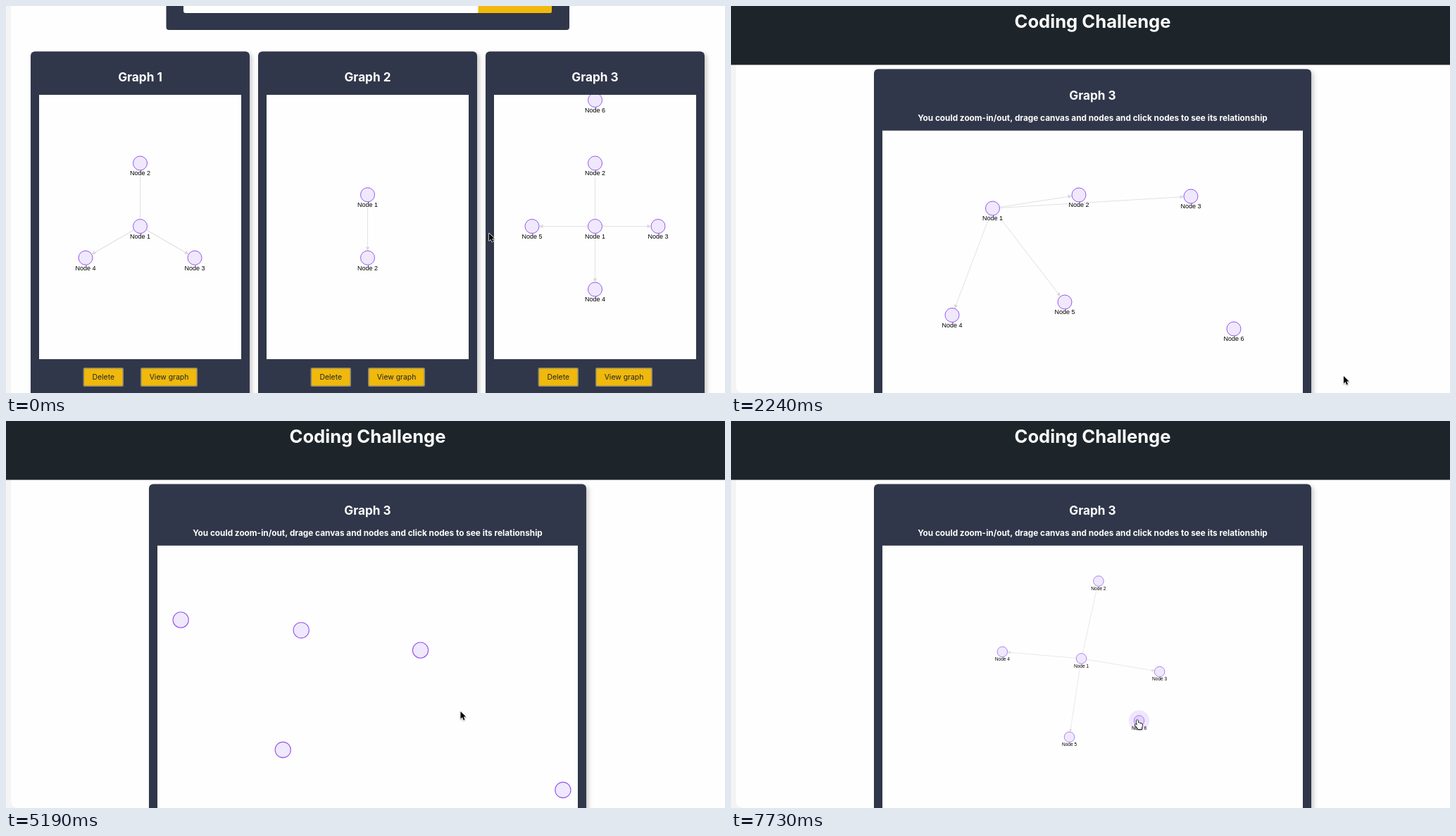
Recreate the animation shown at these times as an HTML page with a canvas. Size 1021x549 px, loop 8000 ms.

```html
<!DOCTYPE html>
<html lang="en">
<head>
<meta charset="utf-8">
<title>Graph viewer</title>
<style>
  html, body { margin: 0; width: 100%; height: 100%; overflow: hidden; background: #fefefe; }
  canvas { display: block; }
</style>
</head>
<body>
<canvas id="stage" width="1021" height="549"></canvas>
<script>
const W = 1021, H = 549, LOOP = 8000;
const STEP = 148.6;  // ms between screen updates; all times below count these steps
const ctx = document.getElementById('stage').getContext('2d');

const PAGE = '#fefefe', PANEL = '#31374a', HEADER = '#1d252a', YELLOW = '#f0b90b';
const UI = 'Inter, sans-serif', LABEL = '9px "Liberation Sans", Arial, sans-serif';
const R = 10;

const mix = (a, b, u) => a + (b - a) * u;
const mixPt = (a, b, u) => [mix(a[0], b[0], u), mix(a[1], b[1], u)];
const progress = (s, from, to) => Math.min(1, Math.max(0, (s - from) / (to - from)));
const smooth = u => u * u * (3 - 2 * u);
const easeOut = (u, p) => 1 - Math.pow(1 - u, p);
const bend = (a, c, b, u) => mixPt(mixPt(a, c, u), mixPt(c, b, u), u);

function rect(x, y, w, h, color, r = 0) {
  ctx.fillStyle = color;
  ctx.beginPath();
  ctx.roundRect(x, y, w, h, r);
  ctx.fill();
}

function text(str, x, y, font, color = PAGE) {
  ctx.font = font;
  ctx.fillStyle = color;
  ctx.textAlign = 'center';
  ctx.fillText(str, x, y);
}

function heading(str, x, y, size) {
  text(str, x, y, `bold ${size}px ${UI}`);
}

function card(x, y, w) {
  ctx.save();
  ctx.shadowColor = 'rgba(0,0,0,.22)';
  ctx.shadowBlur = 6;
  ctx.shadowOffsetX = ctx.shadowOffsetY = 3;
  rect(x, y, w, H, PANEL, 6);
  ctx.restore();
}

function clipped(x, y, w, h, paint) {
  ctx.save();
  rect(x, y, w, h, PAGE);
  ctx.beginPath();
  ctx.rect(x, y, w, h);
  ctx.clip();
  paint();
  ctx.restore();
}

function disc(x, y, r, fill, stroke) {
  ctx.beginPath();
  ctx.arc(x, y, r, 0, 2 * Math.PI);
  ctx.fillStyle = fill;
  ctx.fill();
  if (stroke) {
    ctx.strokeStyle = stroke;
    ctx.lineWidth = 1;
    ctx.stroke();
  }
}

function edge(a, b) {
  const dx = b[0] - a[0], dy = b[1] - a[1];
  const tip = Math.hypot(dx, dy) - R;
  ctx.save();
  ctx.translate(...a);
  ctx.rotate(Math.atan2(dy, dx));
  ctx.strokeStyle = '#dfdfdf';
  ctx.lineWidth = 0.9;
  ctx.beginPath();
  ctx.moveTo(R, 0);
  ctx.lineTo(tip - 4, 0);
  ctx.stroke();
  ctx.fillStyle = '#d9d9d9';
  ctx.beginPath();
  ctx.moveTo(tip, 0);
  ctx.lineTo(tip - 5.5, -2.8);
  ctx.lineTo(tip - 5.5, 2.8);
  ctx.fill();
  ctx.restore();
}

function node([x, y], name, halo) {
  if (halo) disc(x, y, R + halo * 10.3, '#f0e7fd');
  if (name) {
    ctx.font = LABEL;
    ctx.textAlign = 'center';
    ctx.lineJoin = 'round';
    ctx.lineWidth = 3;
    ctx.strokeStyle = PAGE;
    if (!halo) ctx.strokeText(name, x, y + 17.3);
    text(name, x, y + 17.3, LABEL, '#000');
  }
  disc(x, y, R, halo ? '#e3d4fb' : '#f0e8fd', '#9658f0');
}

// Node 1 is the hub of nodes 2 to `linked`; only the last loose node gets a halo.
function graph(pts, linked, detail = true, halo = 0) {
  if (detail) pts.slice(1, linked).forEach(p => edge(pts[0], p));
  pts.forEach((p, i) => node(p, detail && 'Node ' + (i + 1), i < linked ? 0 : halo));
}

// A hub followed by its spokes at the given angles.
function star(hub, len, degrees) {
  const spokes = degrees.map(d => d * Math.PI / 180)
    .map(a => [hub[0] + len * Math.cos(a), hub[1] + len * Math.sin(a)]);
  return [hub, ...spokes];
}

function button(x, w, label, hover) {
  rect(x, 513, w, 27, '#8b8672', 2);
  rect(x + 1.6, 514.6, w - 3.2, 23.8, hover ? '#c89c23' : YELLOW, 1);
  text(label, x + w / 2, 530.4, '10.4px ' + UI, '#20242e');
}

function listGraph(n, cx) {
  const len = 89.5, mid = 312.5;
  if (n === 1) graph(star([cx, mid], len, [-90, 30, 150]), 4);
  if (n === 2) graph(star([cx, mid - len / 2], len, [90]), 2);
  if (n === 3) graph([...star([cx, mid], len, [-90, 0, 90, 180]), [cx, mid - 2 * len]], 5);
}

function listPage(hover) {
  rect(227.5, -40, 572.5, 74, PANEL, 4);
  rect(252, -20, 420, 30, PAGE, 3);
  rect(670.5, -20, 104.5, 30, YELLOW, [0, 0, 2, 0]);
  for (let n = 1; n <= 3; n++) {
    const x = 323 * n - 288, cx = x + 155.5;
    card(x, 64.5, 311);
    heading('Graph ' + n, cx, 107.2, 17.2);
    clipped(x + 12, 126, 287, 375, () => listGraph(n, cx));
    button(x + 74.5, 57.5, 'Delete');
    button(x + 156, 81, 'View graph', hover && n === 3);
  }
}

// A scattered opening pose falls into a star, which then settles.
const OPEN = [[371.5, 287], [494, 268], [653, 270], [314, 438.5], [474, 420], [714, 458]];
const FALLEN = [...star([440, 291], 154, [-71, 22.4, 168.6, 97.7]), [753.5, 492.5]];
const SETTLED = [...star([442, 308.5], 154.5, [-77.5, 9.5, 184.9, 98.7]), [776.5, 512.5]];

function layout(s) {
  const fall = easeOut(progress(s, 15, 19), 1.6), settle = easeOut(progress(s, 19, 27), 2.3);
  return OPEN.map((p, i) => mixPt(mixPt(p, FALLEN[i], fall), SETTLED[i], settle));
}

// Each wheel notch scales by 0.9 around the focus: waves in and out, drifting outwards.
const FOCUS = [647, 413.7], ZOOM_FROM = 30, ZOOM_TO = 43.5;
const zooming = s => s > ZOOM_FROM && s < ZOOM_TO;
function zoom(s) {
  const n = ZOOM_TO * progress(s, 0, ZOOM_TO) - ZOOM_FROM;
  if (n <= 0) return 1;
  return 0.9 ** Math.round(n / 4.5 - 5 * Math.abs(Math.sin(Math.PI * n / 4.5)));
}

const END_ZOOM = zoom(ZOOM_TO);
const GRAB = mixPt(FOCUS, SETTLED[5], END_ZOOM), DROP = [579.5, 425];
const dragged = s => mixPt(GRAB, DROP, smooth(progress(s, 48, 52)));

function detailPage(s) {
  rect(0, 0, W, 83.5, HEADER);
  heading('Coding Challenge', 513.5, 30.5, 25.6);
  card(203, 89.6, 621);
  heading('Graph 3', 513.5, 132.6, 17.2);
  heading('You could zoom-in/out, drage canvas and nodes and click nodes to see its relationship',
    513.5, 162.5, 11.8);

  const pts = layout(s), scale = zoom(s);
  if (s > 48) pts[5] = mixPt(FOCUS, dragged(s), 1 / END_ZOOM);
  clipped(215, 176.7, 597, H, () => {
    ctx.translate(...FOCUS);
    ctx.scale(scale, scale);
    ctx.translate(-FOCUS[0], -FOCUS[1]);
    graph(pts, 5, !zooming(s), progress(s, 45, 47));
  });
}

const ARROW = 'M0 0V10.6L2.5 8.3L4.2 12.2L6 11.4L4.3 7.6H7.6Z';
const HAND = 'M-.8 1C-.8 -.2 1 -.2 1.2 1L2 4.6C2.6 3.8 3.8 4 4 5C4.8 4.4 5.7 4.8 5.9 5.6' +
  'C6.8 5.2 7.6 5.8 7.6 6.8C7.7 9 7 10 6.6 11.2V13H1.4C.8 11.2 -1.6 9 -2.6 7.6' +
  'C-3.2 6.4 -1.8 5.8 -.9 6.8L.2 7.8Z';

function glyph([x, y], shape, fill, line) {
  const path = new Path2D(shape);
  ctx.save();
  ctx.translate(x, y);
  ctx.lineJoin = 'round';
  ctx.shadowColor = 'rgba(0,0,0,.35)';
  ctx.shadowBlur = 2;
  ctx.shadowOffsetY = 1;
  ctx.strokeStyle = line;
  ctx.lineWidth = 1.4;
  ctx.stroke(path);
  ctx.shadowColor = 'transparent';
  ctx.fillStyle = fill;
  ctx.fill(path);
  ctx.restore();
}

const HOME = [686, 322.5], VIEW = [870, 525], REST = [645.5, 412];

function pointerAt(s) {
  if (s < 15) return bend(HOME, [1000, 215], VIEW, smooth(progress(s, 4, 11)));
  if (s < 28) return bend(VIEW, [837.5, 189.5], REST, easeOut(progress(s, 15, 27), 1.5));
  return mixPt(REST, dragged(s), smooth(progress(s, 43, 45)));
}

function pointer(s) {
  const [x, y] = pointerAt(s);
  if (s < 45) glyph([x, y], ARROW, '#000', '#fff');
  else glyph([x - 3, y - 1], HAND, '#fff', '#000');
}

function draw(ms) {
  const s = Math.floor((ms % LOOP + 8) / STEP), list = s < 15;
  rect(0, 0, W, H, '#f4f4f4');
  rect(7, 0, W, H, PAGE, list ? 0 : [0, 0, 0, 10]);
  if (list) listPage(s >= 10);
  else detailPage(s);
  pointer(s);
}

const start = performance.now();
function tick() {
  draw(performance.now() - start);
  requestAnimationFrame(tick);
}
tick();
</script>
</body>
</html>
```
